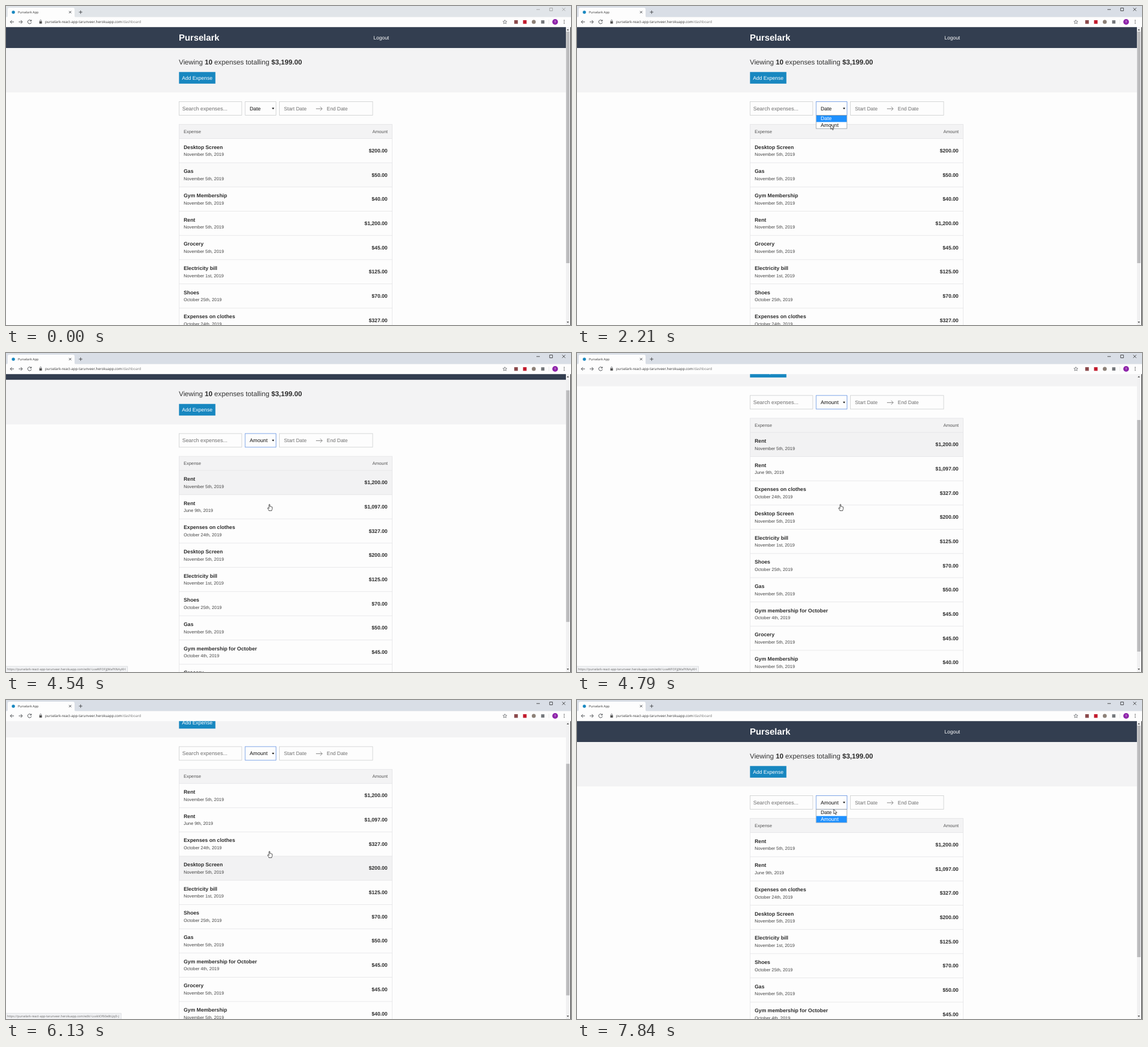
Animation, 997 px wide and 562 px high, one loop 8000 ms. Source, as an HTML page:

```html
<!DOCTYPE html>
<html lang="en">
<head>
<meta charset="utf-8">
<title>Purselark App</title>
<style>
  html, body { margin: 0; width: 100%; height: 100%; overflow: hidden; background: #fdfdfd; }
  svg { display: block; width: 997px; height: 562px; }
  text { font: 9.15px "Liberation Sans", Arial, sans-serif; fill: #333; text-rendering: geometricPrecision; white-space: pre; }
  .ui { font-family: "Open Sans", "Noto Sans", sans-serif; }
  .bold { font-weight: 700; fill: #2b2b2b; }
  .small { font-size: 7.85px; fill: #555; }
  .end { text-anchor: end; }
  .hint { fill: #6f6f6f; font-size: 8.9px; }
  .field { fill: #fdfdfd; stroke: #cacccd; stroke-width: .8; }
  .rule { stroke: #e3e3e5; stroke-width: .8; }
  .icon { fill: none; stroke: #4a4d51; stroke-width: 1; }
  .cursor { fill: #fff; stroke: #111; stroke-width: .75; stroke-linejoin: round; }
</style>
</head>
<body>
<svg viewBox="0 0 997 562">
  <g id="page">
    <rect y="37" width="988" height="37" fill="#333e50"/>
    <text class="bold" x="305" y="61" style="font-size:15.7px;fill:#fff">Purselark</text>
    <text x="648.5" y="59" style="font-size:8.95px;fill:#fff">Logout</text>

    <rect y="74" width="988" height="78.3" fill="#f3f3f4"/>
    <text x="305" y="103" style="font-size:12.15px">Viewing <tspan class="bold">10</tspan> expenses totalling <tspan class="bold">$3,199.00</tspan></text>
    <rect x="305.3" y="116.3" width="64.2" height="20.5" fill="#1887c0"/>
    <text x="310.6" y="129.8" style="font-size:9px;fill:#fff">Add Expense</text>

    <rect class="field" x="305.5" y="168.5" width="110.5" height="24"/>
    <text class="hint" x="311" y="183.7" style="font-size:9.3px">Search expenses...</text>
    <rect class="field" id="select" x="422" y="168.5" width="54.5" height="24"/>
    <text id="choice" x="430" y="183.7" style="fill:#111"></text>
    <path d="M469.3 179.3h4l-2 3z" fill="#111"/>
    <rect class="field" x="482.5" y="168.5" width="164.5" height="24"/>
    <text class="hint" x="490.5" y="183.7">Start Date</text>
    <path d="M547 181h11M554.5 177.5l3.5 3.5l-3.5 3.5" fill="none" stroke="#777" stroke-width=".9"/>
    <text class="hint" x="566" y="183.7">End Date</text>

    <rect x="305.3" y="208.5" width="376.4" height="25" fill="#f3f3f4"/>
    <text class="small" x="313.5" y="223.6">Expense</text>
    <text class="small end" x="673.5" y="223.6">Amount</text>
    <g id="hovers"></g>
    <g id="byDate"></g>
    <g id="byAmount"></g>
    <g id="lines"></g>
    <rect class="rule" x="305.4" y="208.6" width="376.2" height="451.6" fill="none"/>

    <g id="menu">
      <rect x="422" y="192.6" width="54.2" height="23.4" fill="#fff" stroke="#8d949c" stroke-width=".8"/>
      <rect id="pick" x="422.3" width="53.6" height="11.4" fill="#1e90ff"/>
      <text id="opt0" x="430" y="201.2">Date</text>
      <text id="opt1" x="430" y="212.7">Amount</text>
    </g>
  </g>

  <!-- scroll bar -->
  <rect x="988" y="37" width="8" height="525" fill="#f1f1f2"/>
  <rect id="thumb" x="988.4" y="45" width="6.2" height="408" fill="#bcbcbe"/>
  <path d="M989.4 43l2-2.4l2 2.4zM989.4 556l2 2.4l2-2.4z" fill="#505050"/>
  <rect x="996" y="37" width="1" height="525" fill="#222"/>

  <!-- browser frame -->
  <rect id="bar" width="997" height="20"/>
  <path d="M1 20q2 0 2-3V6q0-3 3-3h112q3 0 3 3v11q0 3 2 3z" fill="#fdfdfd"/>
  <circle cx="13" cy="11" r="2.8" fill="#1887c0"/>
  <text class="ui" x="21" y="13" style="font-size:5.6px">Purselark App</text>
  <path class="icon" d="M111.2 8.8l4 4m0-4l-4 4M128.7 10.8h6m-3-3v6" stroke-width=".9"/>
  <path class="icon" id="controls" d="M936 6.2h6M959.3 3.5h5v5h-5zM981.5 3.3l5.4 5.4m0-5.4l-5.4 5.4" style="stroke-width:.8"/>
  <rect y="19.5" width="997" height="17.7" fill="#fdfdfd"/>
  <path class="icon" d="M14 28H7.5m3-3l-3 3l3 3M22.5 28H29m-3-3l3 3l-3 3"/>
  <path class="icon" d="M44.3 26a3.3 3.3 0 1 0 .5 2.8M44.8 24.3v2.3h-2.3"/>
  <path d="M58.8 27h4.6v4h-4.6z" fill="#555"/>
  <path class="icon" d="M59.8 27v-1.2a1.3 1.3 0 0 1 2.6 0V27" style="stroke-width:.7"/>
  <text class="ui" x="69" y="30.4" style="font-size:6.25px">purselark-react-app-tarunveer.herokuapp.com<tspan fill="#777">/dashboard</tspan></text>
  <path class="icon" d="M880.3 24.6l1 2.3l2.5.2l-1.9 1.7l.6 2.4l-2.2-1.3l-2.2 1.3l.6-2.4l-1.9-1.7l2.5-.2z" style="stroke-width:.7"/>
  <rect x="896.8" y="25" width="6.4" height="6.4" fill="#8b4a4c"/>
  <rect x="912.4" y="25" width="6.2" height="6.4" fill="#c21a2c"/>
  <circle cx="931.3" cy="28" r="3.5" fill="#8d8178"/>
  <rect x="944.3" y="25.2" width="5.8" height="5.8" fill="#74777b"/>
  <path d="M958 24v8" stroke="#ddd" stroke-width=".7"/>
  <circle cx="969" cy="28" r="5" fill="#8e24aa"/>
  <text class="ui" x="969" y="30" text-anchor="middle" style="font-size:5.5px;fill:#fff">T</text>
  <g fill="#555"><circle cx="985" cy="25.4" r=".8"/><circle cx="985" cy="28" r=".8"/><circle cx="985" cy="30.6" r=".8"/></g>

  <g id="status">
    <rect id="statusBox" x="-1" y="552" height="11" fill="#f1f2f4" stroke="#d2d4d8" stroke-width=".7"/>
    <text class="ui" id="link" x="2" y="559" style="font-size:5.35px;fill:#666"></text>
  </g>

  <g id="cursor">
    <path class="cursor" id="arrow" d="M0 0v8l1.9-1.7l1.3 3l1.4-.6l-1.3-2.9h2.5z"/>
    <path class="cursor" id="hand" d="M0 .8q.9-1.3 1.7 0v3.4q1-.7 1.5.2q1-.6 1.4.3q1.2-.3 1.2.8v2.6q0 1-.9 2.4v1H-.1v-.9q-1-1.2-2.4-3.4q.4-1.5 1.6-.4l.9.9z"/>
  </g>
</svg>

<script>
const $ = id => document.getElementById(id);
const LOOP = 8000, ROW = 42.67, TOP = 233.5, MAX_SCROLL = 129.5;
const SITE = 'https://purselark-react-app-tarunveer.herokuapp.com/edit/';
const RENT = '-LswWFOFjjJMaPXNAyKH', SCREEN = '-LsxkIiOf60e8tLJqD-J';

const expenses = [
  ['Desktop Screen', 'November 5th', 200],
  ['Gas', 'November 5th', 50],
  ['Gym Membership', 'November 5th', 40],
  ['Rent', 'November 5th', 1200],
  ['Grocery', 'November 5th', 45],
  ['Electricity bill', 'November 1st', 125],
  ['Shoes', 'October 25th', 70],
  ['Expenses on clothes', 'October 24th', 327],
  ['Gym membership for October', 'October 4th', 45],
  ['Rent', 'June 9th', 1097]
];
// Equal amounts go oldest first; the two rents are ordered by amount.
const sorted = [...expenses].reverse().sort((a, b) => b[2] - a[2]);

const money = n => '$' + n.toLocaleString('en-US') + '.00';
const rowsMarkup = list => list.map(([name, day, amount], i) => {
  const y = TOP + i * ROW;
  return `<text class="bold" x="313.5" y="${y + 18}">${name}</text>
    <text class="small" x="313.5" y="${y + 30.7}" style="fill:#444">${day}, 2019</text>
    <text class="bold end" x="673.2" y="${y + 24.4}">${money(amount)}</text>`;
}).join('');
$('byDate').innerHTML = rowsMarkup(expenses);
$('byAmount').innerHTML = rowsMarkup(sorted);
$('lines').innerHTML = expenses.map((_, i) =>
  `<path class="rule" d="M305.4 ${TOP + i * ROW}h376.2"/>`).join('');

// row, pointer enters, pointer leaves
const hovers = [[1, -100, 350], [0, 3790, 5600], [3, 5680, 6690], [0, 6690, 6950]];
$('hovers').innerHTML = hovers.map(([row]) =>
  `<rect x="305.4" y="${TOP + row * ROW}" width="376.2" height="${ROW}" fill="#f2f2f3"/>`).join('');
const hoverRects = [...$('hovers').children];

// time, x, y of the pointer tip
const path = [
  [40, 560, 300], [590, 500, 241], [790, 500, 241], [1540, 452, 184],
  [2000, 452, 184], [2210, 447.8, 209], [3400, 447.8, 209], [3790, 479, 257.6],
  [4090, 464, 266.3], [6750, 464, 266.3], [7290, 455, 184], [7500, 455, 184], [7840, 453, 192.6]
];

const clamp = v => Math.min(1, Math.max(0, v));
const ease = v => v * v * (3 - 2 * v);
const ramp = (t, a, b) => clamp((t - a) / (b - a));
const within = (t, a, b) => t >= a && t < b;
const show = (id, on) => $(id).setAttribute('visibility', on ? 'inherit' : 'hidden');

function pointerAt(t) {
  let i = 0;
  while (i < path.length - 2 && t >= path[i + 1][0]) i++;
  const [t0, x0, y0] = path[i], [t1, x1, y1] = path[i + 1];
  const k = ease(ramp(t, t0, t1));
  return [x0 + (x1 - x0) * k, y0 + (y1 - y0) * k];
}

function draw(t) {
  const scroll = MAX_SCROLL * (ease(ramp(t, 4340, 5030)) - ease(ramp(t, 5780, 6688)));
  $('page').setAttribute('transform', `translate(0 ${-scroll})`);
  $('thumb').setAttribute('y', 45 + scroll * .78);

  const active = t >= 2000;
  $('bar').setAttribute('fill', active ? '#d9dee6' : '#e1e5e9');
  $('controls').style.stroke = active ? '#222' : '#999';
  $('select').style.stroke = active ? '#5b8ce0' : '#cacccd';

  $('choice').textContent = t < 3000 ? 'Date' : 'Amount';
  show('byDate', t < 3050);
  show('byAmount', t >= 3050);

  show('menu', within(t, 2000, 3000) || t >= 7460);
  const picked = t < 2260 ? 0 : 1;
  $('pick').setAttribute('y', picked ? 204.4 : 193);
  [0, 1].forEach(i => $('opt' + i).style.fill = i === picked ? '#fff' : '#111');

  hovers.forEach(([, a, b], i) =>
    hoverRects[i].setAttribute('opacity', ramp(t, a, a + 300) * (1 - ramp(t, b, b + 300))));

  show('status', within(t, 3900, 6950));
  const onScreen = within(t, 5700, 6690);
  $('link').textContent = SITE + (onScreen ? SCREEN : RENT);
  $('statusBox').setAttribute('width', $('link').getComputedTextLength() + 6.5);

  const [x, y] = pointerAt(t), onRow = y > TOP;
  $('cursor').setAttribute('transform', `translate(${x} ${y})`);
  show('cursor', t >= 40);
  show('arrow', !onRow);
  show('hand', onRow);
}

const start = performance.now();
function tick() {
  draw((performance.now() - start) % LOOP);
  requestAnimationFrame(tick);
}
tick();
</script>
</body>
</html>
```
